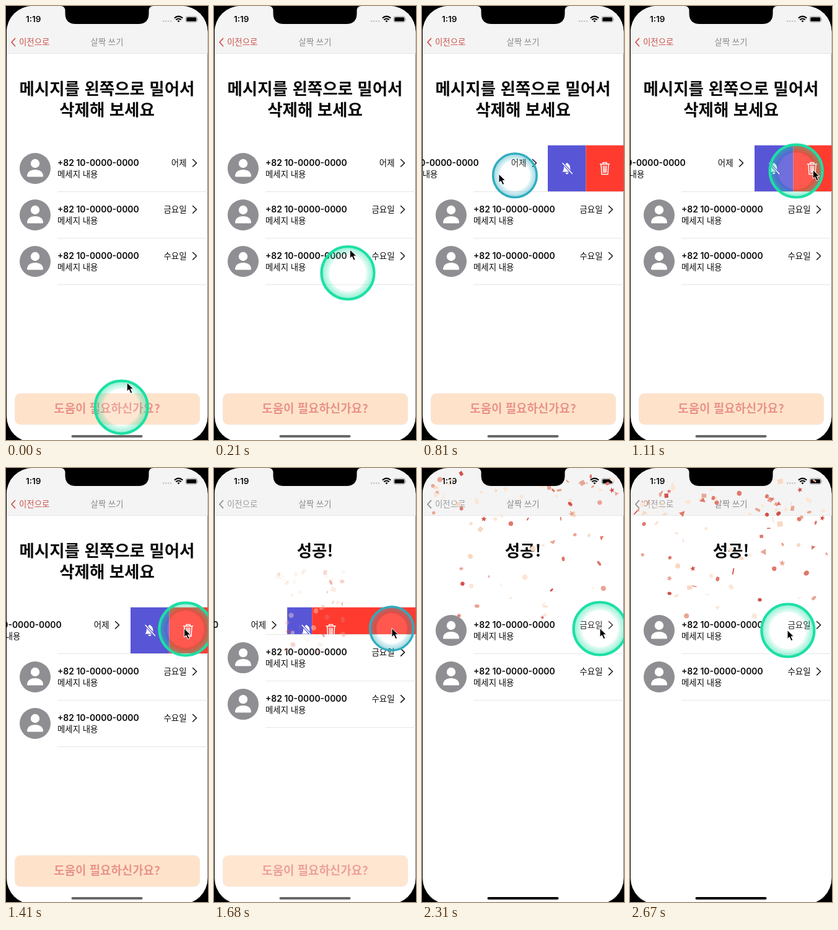
An HTML page that plays this animation: 326x700 px, repeating every 2.7 s.

```html
<!DOCTYPE html>
<html lang="ko">
<head>
<meta charset="utf-8">
<title>Swipe to delete</title>
<style>
html, body { margin: 0; width: 100%; height: 100%; overflow: hidden; background: #000; }
svg { display: block; width: 326px; height: 700px; }
text { font-family: "Noto Sans CJK KR", "Noto Sans CJK", sans-serif; font-size: 13.4px; fill: #0a0a0a; }
.latin { font-family: Inter, sans-serif; font-weight: 600; font-size: 13.9px; }
.title { font-size: 26.5px; font-weight: 700; text-anchor: middle; }
.line { stroke: #e6e6e6; stroke-width: 1; }
.thin { fill: none; stroke-width: 1.5; stroke-linecap: round; stroke-linejoin: round; }
</style>
</head>
<body>
<svg viewBox="0 0 326 700" xmlns="http://www.w3.org/2000/svg">
  <defs>
    <clipPath id="phone"><rect x="1" y="0" width="324.5" height="703.5" rx="42"/></clipPath>
    <clipPath id="rowClip"><rect id="rowBox" x="0" y="224.5" width="326" height="75"/></clipPath>
    <clipPath id="muteClip"><rect id="muteBox" y="224.5" height="75"/></clipPath>
    <clipPath id="binClip"><rect id="binBox" y="224.5" height="75"/></clipPath>
    <radialGradient id="glow">
      <stop offset=".7" stop-color="#fff" stop-opacity=".15"/>
      <stop id="glowIn" offset=".76" stop-opacity=".14"/>
      <stop id="glowOut" offset="1" stop-opacity=".46"/>
    </radialGradient>
    <g id="avatar">
      <circle cx="47" cy="262" r="25" fill="#8e8e93"/>
      <circle cx="47" cy="254" r="7.200" fill="#fff"/>
      <path d="M34 274.500C34 267.500 39.500 264 47 264S60 267.500 60 274.500Q60 275.500 58.500 275.500H35.500Q34 275.500 34 274.500Z" fill="#fff"/>
    </g>
  </defs>
  <rect width="326" height="700" fill="#000"/>
  <g clip-path="url(#phone)">
    <rect width="326" height="700" fill="#fff"/>
    <rect width="326" height="76" fill="#f4f4f4"/>
    <path d="M0 76.500H326" class="line"/>
    <g id="back">
      <path class="thin" style="stroke-width:1.8" d="M14.500 52.500L9 58.500L14.500 64.500"/>
      <text x="21" y="63" style="fill:inherit">이전으로</text>
    </g>
    <text x="163" y="63" text-anchor="middle" style="fill:#8a8a8a">살짝 쓰기</text>

    <g id="ask">
      <text class="title" x="163" y="143">메시지를 왼쪽으로 밀어서</text>
      <text class="title" x="163" y="177">삭제해 보세요</text>
    </g>
    <text id="done" class="title" x="163" y="143">성공!</text>

    <g id="rest"></g>
    <g id="first" clip-path="url(#rowClip)">
      <g id="slide"></g>
      <g clip-path="url(#muteClip)">
        <rect y="224" width="326" height="76" fill="#5856d6"/>
        <g id="mute" fill="#fff">
          <path d="M-7.500 5.500C-5 3-5.500 1-5-2.500C-4.500-6-2.500-7.500-1-8Q0-10.500 1-8C2.500-7.500 4.500-6 5-2.500C5.500 1 5 3 7.500 5.500ZM-2.500 6.800H2.500Q2 9.300 0 9.300T-2.500 6.800Z"/>
          <path d="M-7-8.500L8.500 8.500" stroke="#5856d6" stroke-width="4"/>
          <path d="M-7-8.500L8.500 8.500" stroke="#fff" stroke-width="1.500" stroke-linecap="round"/>
        </g>
      </g>
      <g clip-path="url(#binClip)">
        <rect y="224" width="326" height="76" fill="#ff3b30"/>
        <g id="bin" class="thin" stroke="#fff">
          <path d="M-7.500-7H7.500M-3-7V-9.500H3V-7M-6-7L-5 9.500H5L6-7M-2.500-4L-2 6.500M0-4V6.500M2.500-4L2 6.500"/>
        </g>
      </g>
    </g>
    <path id="firstLine" class="line"/>

    <g id="help">
      <rect x="14.500" y="625" width="298" height="50" rx="9" fill="#fee3ca" stroke="#f6e6da"/>
      <text x="163" y="656" text-anchor="middle" style="font-size:18.900px;font-weight:700;fill:#e9938a">도움이 필요하신가요?</text>
    </g>
    <rect id="home" x="105.500" y="692" width="115" height="4" rx="2"/>

    <text class="latin" x="32" y="26" style="font-size:13.500px">1:19</text>
    <g fill="#c4c4c4"><circle cx="254" cy="24.500" r="1.300"/><circle cx="258" cy="24.500" r="1.300"/><circle cx="262" cy="24.500" r="1.300"/><circle cx="266" cy="24.500" r="1.300"/></g>
    <g fill="none" stroke="#000" stroke-width="2">
      <path d="M271.800 19.500Q278.500 13.800 285.200 19.500M274.200 22.300Q278.500 18.700 282.800 22.300"/>
      <path d="M278.500 26.300L276.300 24.100Q278.500 22.400 280.700 24.100Z" fill="#000" stroke="none"/>
    </g>
    <rect x="290" y="17" width="18.500" height="9" rx="2.700" fill="none" stroke="#999"/>
    <rect x="291.300" y="18.300" width="15.900" height="6.400" rx="1.500"/>
    <path d="M309.700 20Q311.300 21.500 309.700 23Z" fill="#888"/>

    <g id="confetti"></g>
  </g>
  <path d="M88 0Q95.500 0 95.500 8V12Q95.500 29 112.500 29H213.500Q230.500 29 230.500 12V8Q230.500 0 238 0Z"/>
  <g clip-path="url(#phone)">
    <g id="ring">
      <circle r="41" fill="url(#glow)"/>
      <circle id="edge" r="42.500" fill="none" stroke-width="4.200"/>
    </g>
    <path id="arrow" d="M0 0V14.200L3.300 11.200L6 17.300L8.700 16.100L6.100 10.300H10.500Z" stroke="#fff" stroke-width="1"/>
  </g>
</svg>
<script>
const LOOP = 2700, OPEN = 125, ROW = 75;
const $ = id => document.getElementById(id);
const clamp = v => Math.max(0, Math.min(1, v));
const ramp = (t, a, b) => clamp((t - a) / (b - a));
const smooth = (t, a, b) => { const u = ramp(t, a, b); return u * u * (3 - 2 * u); };
const mix = (a, b, u) => a + (b - a) * u;
const set = (id, attrs) => { for (const k in attrs) $(id).setAttribute(k, attrs[k]); };

// Pointer path: time, x, y
const path = [
  [-40, 186, 648], [0, 195, 609], [130, 212, 470], [280, 224, 340], [410, 228, 294],
  [450, 231, 290], [540, 246, 282], [600, 247, 281], [660, 235, 279], [800, 130, 272],
  [870, 108, 270], [950, 112, 268], [1070, 267, 266], [1110, 295, 265], [1190, 301, 262],
  [1400, 288, 259.500], [1430, 287, 259], [2380, 287, 259], [2410, 286, 259],
  [2630, 255, 262], [2670, 254, 262], [2710, 254, 262]
];

function tangent(i, k) {
  const a = path[Math.max(0, i - 1)], b = path[Math.min(path.length - 1, i + 1)];
  return (b[k] - a[k]) / (b[0] - a[0]);
}

function pointer(t) {
  let i = 0;
  while (i < path.length - 2 && path[i + 1][0] <= t) i++;
  const a = path[i], b = path[i + 1], d = b[0] - a[0];
  const u = (t - a[0]) / d, u2 = u * u, u3 = u2 * u;
  return [1, 2].map(k =>
    (2 * u3 - 3 * u2 + 1) * a[k] + (u3 - 2 * u2 + u) * d * tangent(i, k) +
    (3 * u2 - 2 * u3) * b[k] + (u3 - u2) * d * tangent(i + 1, k));
}

const rowBody = day => `<use href="#avatar"/>
  <text class="latin" x="83" y="258">+82 10-0000-0000</text>
  <text x="83" y="276">메세지 내용</text>
  <text x="291.500" y="258" text-anchor="end">${day}</text>
  <path class="thin" stroke="#111" d="M301.500 247.500L307.500 253.300L301.500 259"/>`;
$('slide').innerHTML = rowBody('어제');
$('rest').innerHTML = ['금요일', '수요일'].map((day, i) =>
  `<g transform="translate(0 ${ROW * (i + 1)})">${rowBody(day)}<path class="line" d="M83 299.500H326"/></g>`).join('');

// Confetti: a burst from the middle, then pieces falling from the top
let seed = 41;
const rnd = () => (seed = (seed * 16807) % 2147483647) / 2147483647;
const star = 'M' + Array.from({ length: 10 }, (_, i) => {
  const r = i % 2 ? 2 : 4.600, a = i * Math.PI / 5;
  return (r * Math.sin(a)).toFixed(1) + ' ' + (-r * Math.cos(a)).toFixed(1);
}).join('L') + 'Z';
const dot = 'M-3.800 0A3.800 3.800 0 1 0 3.800 0A3.800 3.800 0 1 0-3.800 0Z';
const shapes = [dot, dot, 'M-4-3L3.500-4L4.500 3L-3 4Z', 'M-4.500 3.500L0-4.500L4.500 3Z', 'M-.8-5H.8V5H-.8Z', star];
const tints = ['#d4514a', '#e0786c', '#eaa593', '#f8d9c3', '#fbe6d6', '#fbe6d6'];
const pieces = Array.from({ length: 98 }, (_, i) => {
  const el = document.createElementNS('http://www.w3.org/2000/svg', 'path');
  el.setAttribute('d', shapes[Math.floor(rnd() * shapes.length)]);
  el.setAttribute('fill', tints[Math.floor(rnd() * tints.length)]);
  $('confetti').append(el);
  return {
    el, burst: i < 44, x: rnd(), y: rnd(), size: mix(.7, 1.200, rnd()),
    turn: rnd() * 360, spin: mix(-.3, .3, rnd()), flip: rnd() * 6, drift: mix(-14, 14, rnd())
  };
});

function drawPiece(p, t) {
  let x, y, alpha;
  if (p.burst) {
    const dt = Math.max(0, t - 1620) / 1000, out = 1 - Math.exp(-dt / .120);
    const fall = Math.max(0, dt - .3);
    x = 155 + (p.x - .5) * 280 * out + p.drift * fall;
    y = mix(265 + 80 * p.y, 14 + 215 * p.y ** 1.300, out) + 45 * fall;
    alpha = t < 1625 ? 0 : mix(.3, 1, ramp(t, 1640, 1840));
  } else {
    const dt = (t - mix(1880, 2480, p.x)) / 1000;
    x = 4 + 310 * ((p.x * 7.310) % 1) + p.drift * dt;
    y = -8 + mix(90, 270, p.y) * dt;
    alpha = dt > 0 ? 1 : 0;
  }
  if (t > 1900) alpha *= 1 - ramp(y, 238, 258);
  const tilt = mix(.4, 1, Math.abs(Math.cos(p.flip + t / 170)));
  p.el.setAttribute('transform', `translate(${x} ${y}) rotate(${p.turn + p.spin * t}) scale(${p.size} ${p.size * tilt})`);
  p.el.setAttribute('opacity', alpha);
}

function drawRow(t) {
  const gone = 1 - (1 - ramp(t, 1625, 1865)) ** 2;
  let s = 0;
  if (t > 600) s = t < 870 ? Math.max(0, 247 - pointer(t)[0]) : mix(139, OPEN, smooth(t, 870, 1040));
  const h = ROW * (1 - gone);
  const left = (326 - s) * (1 - gone);
  const mid = mix(326 - s / 2, 8, gone);
  set('slide', { transform: `translate(${-s - 200 * gone} 0)` });
  set('rowBox', { height: h });
  set('muteBox', { x: left, width: Math.max(0, mid - left) });
  set('binBox', { x: mid, width: 326 - mid });
  set('mute', { transform: `translate(${left + 31} 262)` });
  set('bin', { transform: `translate(${mid + 30.500} 262)` });
  set('first', { visibility: gone < 1 ? 'visible' : 'hidden' });
  set('rest', { transform: `translate(0 ${-ROW * gone})` });
  set('firstLine', {
    d: `M${gone < 1 ? 83 : 0} ${299.500 - ROW * gone}H326`,
    style: gone < 1 ? '' : 'stroke:#c8c8c8',
    opacity: 1 - ramp(t, 1960, 2060)
  });
}

function drawPointer(t) {
  const [x, y] = pointer(t), [rx, ry] = pointer(t - 40);
  const press = smooth(t, 580, 650) - smooth(t, 870, 960) + smooth(t, 1470, 1550) - smooth(t, 1690, 1800);
  const rgb = `rgb(${mix(28, 48, press)},${mix(224, 172, press)},${mix(165, 192, press)})`;
  set('arrow', { transform: `translate(${x} ${y - .5})` });
  set('ring', { transform: `translate(${rx} ${ry}) scale(${mix(1, .830, press)})` });
  set('edge', { stroke: rgb });
  set('glowIn', { 'stop-color': rgb });
  set('glowOut', { 'stop-color': rgb });
}

function draw(t) {
  const won = t >= 1605;
  set('ask', { visibility: won ? 'hidden' : 'visible' });
  set('done', { visibility: won ? 'visible' : 'hidden' });
  set('back', { fill: won ? '#9a9a9a' : '#cf4f49' });
  $('back').firstElementChild.style.stroke = won ? '#8a8a8a' : '#cf4f49';
  set('help', { opacity: 1 - smooth(t, 1630, 1850) });
  const g = Math.round(mix(104, 0, smooth(t, 1900, 2130)));
  set('home', { fill: `rgb(${g},${g},${g})` });
  drawRow(t);
  pieces.forEach(p => drawPiece(p, t));
  drawPointer(t);
}

const start = performance.now();
function tick(now) {
  draw(Math.max(0, now - start) % LOOP);
  requestAnimationFrame(tick);
}
draw(0);
requestAnimationFrame(tick);
</script>
</body>
</html>
```
